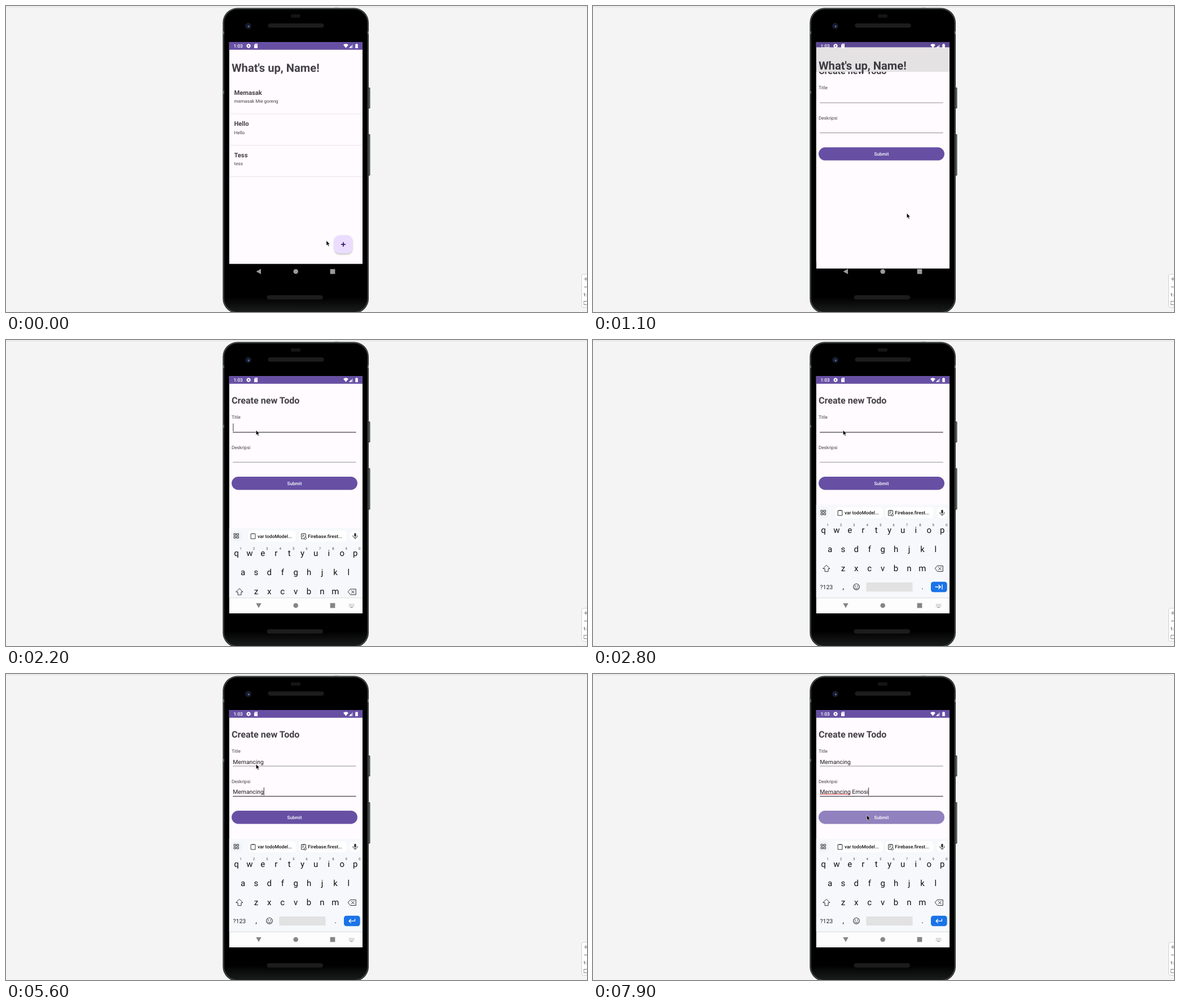
Write an HTML page that moves like this. It is 1030 px wide and 544 px high and loops after 8 s.

```html
<!DOCTYPE html>
<html lang="id">
<head>
<meta charset="utf-8">
<title>Todo app</title>
<style>
html, body { margin: 0; width: 100%; height: 100%; overflow: hidden; background: #f4f4f4; }
svg { display: block; width: 100vw; height: 100vh; }
text { font-family: Roboto, sans-serif; white-space: pre; text-rendering: geometricPrecision; }
.mid { text-anchor: middle; }
.line { fill: none; stroke: #303134; stroke-width: 1; stroke-linejoin: round; stroke-linecap: round; }
</style>
</head>
<body>
<svg id="stage" viewBox="0 0 1030 544"></svg>
<script>
const LOOP = 8000, STEP = 100;
const INK = '#434047', PAPER = '#fffbfe', PURPLE = '#6750a4';

const rect = (x, y, w, h, fill, r = 0, extra = '') =>
  `<rect x="${x}" y="${y}" width="${w}" height="${h}" fill="${fill}" rx="${r}" ${extra}/>`;
const circle = (x, y, r, fill, extra = '') =>
  `<circle cx="${x}" cy="${y}" r="${r}" fill="${fill}" ${extra}/>`;
const path = (d, fill, extra = '') => `<path d="${d}" fill="${fill}" ${extra}/>`;
const line = (d, extra = '') => `<path class="line" d="${d}" ${extra}/>`;
const text = (x, y, size, str, fill = INK, weight = 400, extra = '') =>
  `<text x="${x}" y="${y}" font-size="${size}" fill="${fill}" font-weight="${weight}" ${extra}>${str}</text>`;
const clip = (id, shape) => `<clipPath id="${id}">${shape}</clipPath>`;

const page = content =>
  rect(395.5, 64, 236.7, 394.5, PAPER) + rect(395.5, 64, 236.7, 13.8, PURPLE) + content;

function phone() {
  const slot = (x, y) => rect(x, y, 98.5, 6.6, '#1c1c1c', 3.2, 'stroke="#292929" stroke-width=".6"');
  const sideKey = (y, h) => rect(642, y, 3.5, h, '#2a2f2d', 1) + rect(643, y + 1, 1.4, h - 2, '#6a716e');
  return sideKey(145, 37) + sideKey(228, 73.5) +
    rect(384.3, 3.4, 258.7, 543, '#1c201e', 26) +
    rect(386, 5.1, 255.3, 539.6, 'url(#glass)', 24.5, 'stroke="#4a514e" stroke-width="1.2"') +
    [[384.8, 45], [384.8, 151], [641, 45]].map(([x, y]) => rect(x, y, 1.8, 5, '#747b78')).join('') +
    rect(505, 14.8, 17, 6, '#151515', 2) +
    circle(429.5, 35.5, 5.4, '#1b1d24') + circle(429.5, 35.5, 3.6, '#121a35') +
    circle(430, 36, 1.8, '#435084') + circle(430.4, 36.8, .7, '#a9b4df') +
    slot(464.8, 31.4) + slot(463, 514.7);
}

function statusIcons() {
  const teeth = [0, 45, 90, 135].map(a =>
    rect(429, 67.2, 2, 7.6, '#fff', .4, `transform="rotate(${a} 430 71)"`)).join('');
  return text(403.6, 74.2, 8.2, '1:03', '#fff', 500) +
    teeth + circle(430, 71, 2.8, '#fff') + circle(430, 71, 1.3, PURPLE) +
    path('M442 67h4v8h-6v-6z', '#fff') +
    path('M442 68.3v1.5M443.4 68.3v1.5M444.8 68.3v1.5', 'none', `stroke="${PURPLE}" stroke-width=".6"`) +
    path('M598 69Q602.5 65.5 607 69L602.5 74.8Z', '#fff') +
    path('M608 74.8L615 67.8V74.8Z', '#fff', 'opacity=".45"') + path('M608 74.8L612.5 70.3V74.8Z', '#fff') +
    path('M619.3 68h1.3v-1h1.9v1h1.3v7h-4.5z', '#fff');
}

function listPage() {
  const items = [['Memasak', 'memasak Mie goreng'], ['Hello', 'Hello'], ['Tess', 'tess']];
  const rows = items.map(([title, note], i) => {
    const y = 55.8 * i;
    return text(404.4, 157.6 + y, 11.2, title, INK, 700) + text(404.6, 171.7 + y, 8.1, note) +
      rect(395.5, 191.5 + y, 236.7, .8, '#e6dcdf');
  }).join('');
  return page(
    text(400, 117.2, 20.15, "What's up, Name!", INK, 700) + rows +
    rect(582, 407.6, 32, 32, '#eaddff', 9.2, 'filter="url(#shadow)"') +
    `<g clip-path="url(#fabClip)">${circle(594, 427, 0, '#21005d', 'id="fabRipple"')}</g>` +
    path('M594 423.8H602M598 419.8V427.8', 'none', 'stroke="#21005d" stroke-width="1.5"'));
}

function field(id, label, y) {
  return text(400, y, 8.1, label) +
    rect(402, y + 23.2, 218.7, .8, '#77727a', 0, `id="${id}Line"`) +
    text(402.3, y + 19.3, 10.37, '', '#1d1b20', 400, `id="${id}Text"`) +
    rect(402.3, y + 8.2, 1, 14, '#333036', 0, `id="${id}Caret"`);
}

function formPage() {
  return page(
    text(400, 113, 16.1, 'Create new Todo', INK, 700) +
    field('title', 'Title', 140.2) + field('note', 'Deskripsi', 193.6) +
    rect(402.4, 213.2, 53.8, 1.1, '#e2514c', 0, 'id="spelling"') +
    rect(400, 243.1, 223, 23.3, PURPLE, 11.65) +
    `<g clip-path="url(#buttonClip)">${circle(486, 254, 0, '#fff', 'id="buttonRipple"')}</g>` +
    text(511.5, 257.9, 8.1, 'Submit', '#fff', 500, 'class="mid"'));
}

function keyboard() {
  const row = (letters, x, y) => [...letters].map((c, i) =>
    text(x + 23.42 * i, y, 15, c, '#111', 400, 'class="mid"')).join('');
  const digits = [...'1234567890'].map((c, i) =>
    text(416 + 23.42 * i, 331.4, 6.2, c, '#444', 400, 'class="mid"')).join('');
  const chip = (x, label, tx) =>
    rect(x, 297.3, 84.5, 19.8, '#fff', 6) +
    line(`M${x + 5} 303.2h7.4v8.8h-7.4zM${x + 7} 303h3.4`, 'stroke-width="1.2"') +
    text(tx, 310.2, 8.35, label, '#111', 500);
  const grid = [0, 1, 2, 3].map(i =>
    line(`M${404.4 + 5 * (i % 2)} ${302.8 + 5 * (i >> 1)}h3v3h-3z`)).join('');
  const mic = rect(617.3, 301.8, 3.4, 6.6, '#303134', 1.7) +
    line('M615 306.5Q615 310.3 619 310.3Q623 310.3 623 306.5M619 310.3V312.5');
  return rect(395.5, 293, 236.7, 165.5, '#f6f8fb') +
    circle(408.6, 307, 10, '#f0f3f7') + grid +
    chip(429.5, 'var todoModel...', 446) + chip(519, 'Firebase.firest...', 535.3) +
    line('M525.5 306h3M525.5 308.3h1.5', 'stroke-width=".8"') + circle(530.5, 311, 1.9, '#fff', 'stroke="#303134"') +
    circle(619, 307, 10, '#fff') + mic +
    digits + row('qwertyuiop', 408.5, 342.8) + row('asdfghjkl', 420, 376.6) + row('zxcvbnm', 443.4, 410.8) +
    line('M414 400.6L420 406.5H417V411.7H411V406.5H408Z') +
    line('M610.5 401.5H620.3V411.5H610.5L606.5 406.5ZM612.3 404l5 5M617.3 404l-5 5') +
    text(413.9, 442.7, 10.5, '?123', '#222', 400, 'class="mid"') +
    text(443.6, 443, 14, ',', '#222', 400, 'class="mid"') + text(584, 443, 14, '.', '#222', 400, 'class="mid"') +
    circle(467, 438.8, 5.3, 'none', 'stroke="#303134" stroke-width="1.1"') +
    circle(465.1, 437.4, .9, '#303134') + circle(468.9, 437.4, .9, '#303134') +
    line('M464.2 440.2Q467 443.8 469.8 440.2') +
    rect(484.4, 431, 82.2, 16.2, '#e2e2e2', 1.5) +
    rect(599, 429.7, 28.7, 18.6, '#1a73e8', 4.5) +
    line('', 'id="actionKey" style="stroke:#fff;stroke-width:1.3"');
}

function lightNavBar() {
  const dots = [0, 1, 2].map(i => line(`M608 ${469.8 + 2 * i}h9`,
    'style="stroke:#8b8b8b;stroke-dasharray:1 1;stroke-linecap:butt"')).join('');
  return rect(395.5, 458.3, 236.7, 27.8, '#fdfdfe') + dots + line('M610.5 475.5h4', 'style="stroke:#8b8b8b"');
}

function sidePanel() {
  const mark = d => line(d, 'style="stroke:#777"');
  return rect(1020.5, 477, 20, 58.5, '#fff', 3, 'stroke="#cfcfcf"') +
    mark('M1025 485.3h6M1028 482.3v6') + mark('M1025 499.5h6') +
    text(1023.5, 516, 7.2, '1:1', '#333', 500) +
    mark('M1024.5 527V525H1030M1024.5 529V531H1030');
}

document.getElementById('stage').innerHTML = `
<defs>
  <linearGradient id="glass" x2="0" y2="1"><stop offset=".95"/><stop offset="1" stop-color="#1b1e1c"/></linearGradient>
  <filter id="shadow" x="-30%" y="-30%" width="160%" height="170%">
    <feDropShadow dx="0" dy="1.8" stdDeviation="1.8" flood-color="#000" flood-opacity=".28"/></filter>
  ${clip('screen', rect(395.5, 64, 236.7, 422, '#000'))}
  ${clip('aboveNav', rect(395.5, 64, 236.7, 394.3, '#000'))}
  ${clip('reveal', rect(395.5, 64, 236.7, 422, '#000', 0, 'id="revealBox"'))}
  ${clip('fabClip', rect(582, 407.6, 32, 32, '#000', 9.2))}
  ${clip('buttonClip', rect(400, 243.1, 223, 23.3, '#000', 11.65))}
</defs>
${rect(0, 0, 1030, 544, '#f4f4f4')}${rect(0, 1.3, 1030, 1, '#dcdcdc')}${rect(582, 2.3, 8, 1.2, '#c8c8c8')}
${phone()}
<g clip-path="url(#screen)">
  <g id="list">${listPage()}${rect(395.5, 64, 236.7, 394.5, '#000', 0, 'id="dim"')}</g>
  <g clip-path="url(#reveal)"><g id="form">${formPage()}</g></g>
  <g clip-path="url(#aboveNav)"><g id="keys">${keyboard()}</g></g>
  <g id="lightNav">${lightNavBar()}</g>
  ${statusIcons()}
  <g id="nav">${path('M443.5 472L452 467.3V476.7Z', 'inherit', 'id="back"')}
  ${circle(513.7, 472, 4.3, 'inherit')}${rect(574.7, 467.7, 8.7, 8.7, 'inherit')}</g>
</g>
${sidePanel()}
${path('M0 0V8.8L2 7L3.5 10.2L4.9 9.6L3.5 6.5H6.1Z', '#000', 'id="pointer" stroke="#fff" stroke-width=".5"')}`;

const el = Object.fromEntries([...document.querySelectorAll('#stage [id]')].map(n => [n.id, n]));
const set = (node, attrs) => { for (const k in attrs) node.setAttribute(k, attrs[k]); };
const show = (node, on) => node.setAttribute('visibility', on ? 'visible' : 'hidden');
const progress = (t, from, to) => Math.min(1, Math.max(0, (t - from) / (to - from)));

// Cubic curve through (x0,y0)..(x3,y3), solved for y at x.
function curveY(x, [x0, y0, x1, y1, x2, y2, x3, y3]) {
  const at = (u, a, b, c, d) =>
    a * (1 - u) ** 3 + 3 * b * u * (1 - u) ** 2 + 3 * c * u * u * (1 - u) + d * u ** 3;
  let lo = 0, hi = 1;
  for (let i = 0; i < 24; i++) {
    const u = (lo + hi) / 2;
    if (at(u, x0, x1, x2, x3) < x) lo = u; else hi = u;
  }
  return at(lo, y0, y1, y2, y3);
}
const slideEase = x => curveY(x, [0, 0, .4, 0, .2, 1, 1, 1]);
const revealEase = x => x < 1 / 6
  ? curveY(x, [0, 0, .05, 0, .1333, .06, .1667, .4])
  : curveY(x, [.1667, .4, .2083, .82, .25, 1, 1, 1]);

const pointerKeys = [
  [0, 568, 417], [200, 577, 420], [400, 592, 425], [800, 592, 425], [900, 589, 420], [1000, 578, 402],
  [1100, 556.3, 368.3], [1300, 492, 257], [1400, 463, 208], [1500, 446, 177], [1600, 444, 166], [1700, 443.3, 160.3],
  [7100, 443.3, 160.3], [7200, 449, 174], [7300, 464, 206], [7400, 479, 239], [7500, 485.5, 251]
];
function pointerAt(t) {
  const i = pointerKeys.findIndex(k => k[0] > t);
  if (i < 0) return pointerKeys.at(-1).slice(1);
  const [a, b] = [pointerKeys[i - 1], pointerKeys[i]], p = progress(t, a[0], b[0]);
  return [a[1] + (b[1] - a[1]) * p, a[2] + (b[2] - a[2]) * p];
}

// [time, letters typed by then]
const titleTyping = [[3100, 1], [3200, 3], [3300, 4], [3500, 5], [3600, 6], [3700, 7], [3800, 8], [4000, 9]];
const noteTyping = [[5000, 1], [5100, 2], [5200, 4], [5300, 5], [5400, 7], [5600, 9], [5800, 10],
  [6000, 11], [6100, 12], [6200, 13], [6300, 14], [6400, 15]];
const typed = (str, keys, t) => str.slice(0, keys.reduce((n, k) => t >= k[0] ? k[1] : n, 0));
const within = (t, spans) => spans.some(([a, b]) => t >= a && t < b);

function updateField(id, str, focused, caretOn) {
  const label = el[id + 'Text'];
  label.textContent = str;
  set(el[id + 'Line'], focused ? { height: 1.3, fill: '#49454f' } : { height: .8, fill: '#77727a' });
  set(el[id + 'Caret'], { x: 402.3 + (str ? label.getComputedTextLength() : 0) });
  show(el[id + 'Caret'], caretOn);
}

function render(t) {
  const open = progress(t, 947, 1372), slide = slideEase(open);
  const offset = 17.3 * (1 - slide);
  const top = 64 + offset + 422 * .96 * (1 - revealEase(open));
  set(el.list, { transform: `translate(0 ${-8.4 * slide})`, visibility: open < 1 ? 'visible' : 'hidden' });
  set(el.dim, { opacity: .1 * progress(t, 947, 1064) });
  set(el.form, { transform: `translate(0 ${offset})` });
  set(el.revealBox, { y: top, height: open > 0 ? Math.max(0, 486 - top) : 0 });

  const press = progress(t, 650, 900);
  set(el.fabRipple, { r: 30 * press, opacity: .12 * press });
  const submit = progress(t, 7600, 7900);
  set(el.buttonRipple, { r: 150 * submit, opacity: .28 * submit });

  const up = progress(t, 2000, 2400), keysShown = up > 0;
  set(el.keys, { transform: `translate(0 ${165.5 * (1 - up) ** 2})` });
  show(el.keys, keysShown);
  show(el.lightNav, keysShown);
  set(el.nav, { fill: keysShown ? '#858585' : '#999' });
  set(el.back, { transform: keysShown ? 'rotate(-90 448 472)' : '' });
  set(el.actionKey, { d: t < 4500
    ? 'M607 439H616M612.7 435.5L616.2 439L612.7 442.5M619 435V443'
    : 'M618.5 435.7V439.2H608.2M611.3 436L608.1 439.2L611.3 442.4' });

  updateField('title', typed('Memancing', titleTyping, t), t >= 1900 && t < 4400,
    within(t, [[1900, 2800], [3100, 4400]]));
  updateField('note', typed('Memancing Emosi', noteTyping, t), t >= 4400,
    within(t, [[4400, 4900], [5000, 7000], [7500, LOOP]]));
  show(el.spelling, t >= 5900);

  set(el.pointer, { transform: `translate(${pointerAt(t)})` });
}

const start = performance.now();
function tick() {
  const t = (performance.now() - start) % LOOP;
  render(Math.floor(t / STEP) * STEP);
  requestAnimationFrame(tick);
}
tick();
</script>
</body>
</html>
```
